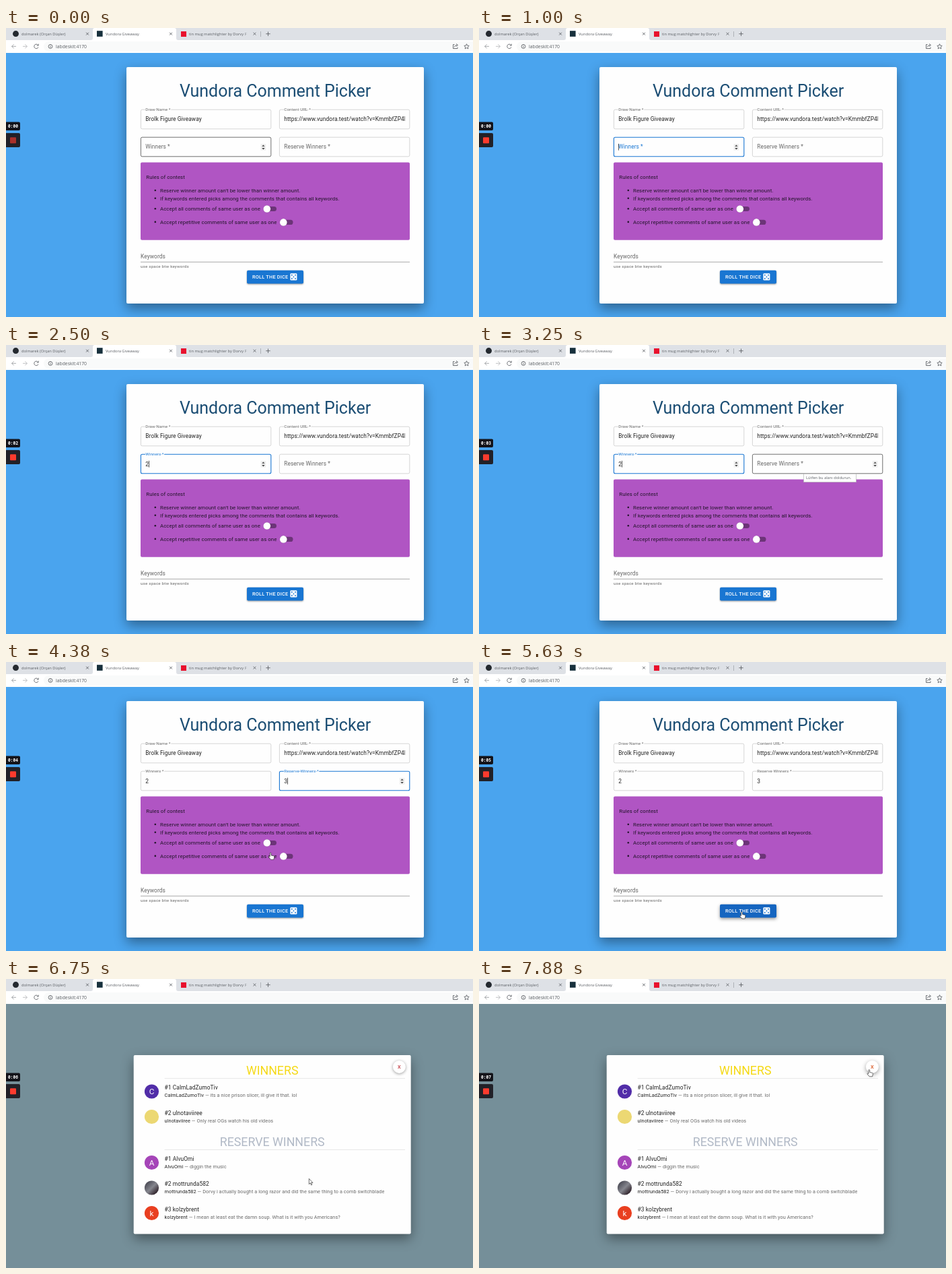
An HTML page for the animation above (8000 ms loop, 694 by 429 pixels).

```html
<!DOCTYPE html>
<html lang="en">
<head>
<meta charset="utf-8">
<title>Comment Picker</title>
<style>
  html, body { margin: 0; width: 100%; height: 100%; overflow: hidden; background: #4aa4ee; }
  svg { display: block; width: 694px; height: 429px; }
  text { font-family: Roboto, sans-serif; white-space: pre; }
  .ui { font-family: "Open Sans", sans-serif; fill: #5a5e63; }
  .body { letter-spacing: .00938em; }
  .label { letter-spacing: .00938em; paint-order: stroke; stroke: #fff; stroke-width: 2.5px; }
  .mid { text-anchor: middle; }
  .line { fill: none; stroke: #5f6368; stroke-width: .9; }
  .sheet { fill: #fefefe; filter: drop-shadow(0 7px 9px rgba(0,0,0,.4)); }
</style>
</head>
<body>
<svg id="stage" viewBox="0 0 694 429"></svg>
<script>
const LOOP = 8000, STEP = 125;
const stage = document.getElementById('stage');
const $ = id => document.getElementById(id);

const text = (x, y, s, size, fill, extra = 'class="body"') =>
  `<text x="${x}" y="${y}" font-size="${size}" fill="${fill}" ${extra}>${s}</text>`;
const ui = (x, y, s, size = 5.75) => text(x, y, s, size, '#5a5e63', 'class="ui"');
const rect = (x, y, w, h, fill, r = 0, extra = '') =>
  `<rect x="${x}" y="${y}" width="${w}" height="${h}" rx="${r}" fill="${fill}" ${extra}/>`;
const circle = (x, y, r, fill, extra = '') =>
  `<circle cx="${x}" cy="${y}" r="${r}" fill="${fill}" ${extra}/>`;
const path = (d, extra = 'class="line"') => `<path d="${d}" ${extra}/>`;
const cross = x => path(`M${x - 1.9} 6.7l3.8 3.8m0-3.8l-3.8 3.8`);

const browser = () =>
  rect(0, 0, 694, 18, '#dee1e6') +
  path('M126 18Q129 18 129 15V3Q129 0 132 0H250Q253 0 253 3V15Q253 18 256 18Z', 'fill="#fff"') +
  rect(0, 18, 694, 19, '#fff') + rect(56, 20, 650, 15, '#f9fafa', 7.5) +
  circle(14.5, 8.6, 4.5, '#24292f') + ui(23, 10.8, 'dolmarek (Orçan Düşler)') + cross(121) +
  rect(135, 4.2, 8.6, 8.6, '#17303c') + ui(148, 10.8, 'Vundora Giveaway') + cross(245) +
  rect(260, 5, 8, 8, '#e8112d') + ui(272, 10.8, 'tin mug matchlighter by Dorvy F') +
  rect(352, 2, 24, 14, 'url(#fade)') + cross(369.5) +
  path('M378.5 5V13', 'stroke="#9a9ea3" stroke-width=".7"') +
  path('M386.3 8.7h6.4M389.5 5.5v6.4') +
  path('M15 27.3H8.6m3-3l-3 3 3 3', 'class="line" stroke-opacity=".6"') +
  path('M25 27.3h6.4m-3-3l3 3-3 3', 'class="line" style="stroke:#babcbe"') +
  path('M47.6 25.4A3.2 3.2 0 1 0 48 28.4M48.2 23.6V26h-2.4') +
  circle(66, 27.4, 2.9, 'none', 'class="line"') + path('M66 27v2M66 25.4v.8') +
  ui(74, 29.9, 'labdeskit:4170', 6.8) +
  path('M666.5 24.5h-2v6h6.5v-2M666.3 28.5q.4-3 4-3M669 23.4l2.5 2-2.5 2') +
  path('M684.5 23.7l1.1 2.4 2.6.3-1.9 1.8.5 2.6-2.3-1.3-2.3 1.3.5-2.6-1.9-1.8 2.6-.3z');

const recorder = () =>
  rect(-4, 139.5, 25, 12.5, '#131319', 2) +
  text(3, 148.2, '0:00', 6.2, '#fff',
    'id="clock" font-weight="700" style="font-family:\'Noto Sans Mono\',monospace"') +
  rect(-4, 156, 25, 21, '#222128', 2) + rect(6, 162.3, 9, 9, '#fb3b2e', 1, 'id="rec"');

const spinner = (x, id) =>
  `<g id="${id}">${rect(x - 3.8, 172, 7.6, 9.6, '#efefef')}` +
  path(`M${x - 2.2} 175.8l2.2-2.4 2.2 2.4zm0 2.2l2.2 2.4 2.2-2.4z`, 'fill="#454545"') + '</g>';

const field = (x, y, label, id = '') =>
  rect(x + .4, y, 193.4, 28.6, 'none', 2, `stroke="#c4c4c4" stroke-width=".7" id="${id}Box"`) +
  `<text id="${id}Label" class="label" font-size="8.3" fill="#666"
    transform="translate(${x + 7.3} ${y + 1.4}) scale(.75)">${label}</text>`;

const toggle = (x, y) =>
  rect(x - 3.5, y - 3.6, 17.7, 7.2, '#6c3478', 3.6) +
  circle(x, y, 5.3, '#fff', 'style="filter:drop-shadow(0 .6px .7px rgba(0,0,0,.4))"');

const rule = (y, s) => circle(221.8, y - 2.7, 1.3, '#22142a') + text(229, y, s, 7.82, '#22142a');

const dice = () => rect(422.4, 364.2, 10, 10.4, '#fff', 1.4) +
  [[-2.6, -2.6], [2.6, -2.6], [0, 0], [-2.6, 2.6], [2.6, 2.6]]
    .map(([x, y]) => circle(427.4 + x, 369.4 + y, .95, '#1976d2')).join('');

const form = () => `<g id="form">` +
  rect(179, 58, 442, 351, '#fefefe', 2, 'class="sheet"') +
  text(400, 102, 'Vundora Comment Picker', 25, '#1c4e74', 'class="mid"') +
  field(200, 121.2, 'Draw Name *', 'draw') + field(406, 121.2, 'Content URL *', 'url') +
  text(207.3, 138, 'Brolk Figure Giveaway', 8.4, '#222') +
  `<g clip-path="url(#urlClip)">` +
  text(413.3, 138, 'https://www.vundora.test/watch?v=KmmbfZP4RQ', 8.4, '#222') + '</g>' +
  field(200, 162.2, 'Winners *', 'win') + field(406, 162.2, 'Reserve Winners *', 'res') +
  text(207.3, 179.8, '2', 8.4, '#222', 'id="winValue"') +
  text(413.3, 179.8, '3', 8.4, '#222', 'id="resValue"') +
  spinner(382.4, 'winSpin') + spinner(588.6, 'resSpin') + rect(0, 171.8, .7, 9.8, '#111', 0, 'id="caret"') +
  rect(200, 199.6, 400, 115.2, '#b055c3', 2) +
  text(208.3, 224.2, 'Rules of contest', 7.82, '#22142a') +
  rule(243.7, "Reserve winner amount can't be lower than winner amount.") +
  rule(255.5, 'If keywords entered picks among the comments that contains all keywords.') +
  rule(271, 'Accept all comments of same user as one') + toggle(387.8, 268.5) +
  rule(290.6, 'Accept repetitive comments of same user as one') + toggle(412.3, 288.4) +
  text(200, 342.2, 'Keywords', 8.4, '#666') +
  path('M200 347.4H600', 'stroke="#8c8c8c" stroke-width=".7"') +
  text(200, 356.4, 'use space btw keywords', 6.2, '#666', 'letter-spacing=".21"') +
  rect(358, 359.7, 84, 19.8, '#1976d2', 2, 'id="roll"') +
  text(366, 372.2, 'ROLL THE DICE', 7.35, '#fff', 'font-weight="500" letter-spacing=".21"') + dice() +
  `<g id="tip">${rect(482.5, 191.2, 78, 12.3, '#fff', 0, 'stroke="#b5b5b5" stroke-width=".7"')}` +
  ui(486, 199.4, 'Lütfen bu alanı doldurun.', 5.7) + '</g></g>';

const entry = (y, rank, name, comment) =>
  text(235.6, y - 3, `#${rank} ${name}`, 8.4, '#222') +
  text(235.6, y + 8.3, `<tspan fill="#222">${name}</tspan> — ${comment}`, 7.3, '#6a6a6a');
const letter = (y, s, fill) =>
  circle(216.5, y, 10.6, fill) + text(216.5, y + 4.2, s, 11.8, '#fff', 'class="mid"');

const dialog = () => `<g id="dialog">` + rect(0, 37, 694, 392, '#758f99') +
  rect(189.7, 113, 412, 265.6, '#fefefe', 2, 'class="sheet"') +
  text(395.7, 142.2, 'WINNERS', 17.8, '#f5d916', 'class="mid"') +
  text(395.7, 248.3, 'RESERVE WINNERS', 17.8, '#b1b9c6', 'class="mid"') +
  path('M235.6 147.6H593M235.6 253.4H593', 'stroke="#dedede" stroke-width=".7"') +
  entry(167, 1, 'CalmLadZumoTiv', 'its a nice prison slicer, ill give it that. lol') +
  entry(204.6, 2, 'ulnotaviiree', 'Only real OGs watch his old videos') +
  entry(272.6, 1, 'AlvuOmi', 'diggin the music') +
  entry(310, 2, 'mottrunda582', 'Dorvy i actually bought a long razor and did the same thing to a comb switchblade') +
  entry(347.6, 3, 'kolzybrent', 'I mean at least eat the damn soup. What is it with you Americans?') +
  `<g id="lateAvatar">${letter(167, 'C', '#512da8')}</g>` +
  circle(216.5, 204.5, 10.6, '#ecd873') +
  letter(272.5, 'A', '#a545b8') +
  circle(216.5, 310, 10.6, 'url(#dusk)') + letter(347.5, 'k', '#e93f20') +
  circle(584.4, 130.4, 9.5, '#fff', 'id="close"') +
  text(584.4, 133, 'X', 7.4, '#c2373f', 'id="closeX" class="mid" font-weight="500"') + '</g>';

const outline = 'fill="#fff" stroke="#333" stroke-width=".7" stroke-linejoin="round"';
const pointer = () => `<g id="pointer">` +
  path('M0 0V8.2L1.9 6.5 3.3 9.6 4.5 9 3.2 6.1H5.7Z', `id="arrow" ${outline}`) +
  path('M-.6 .6Q.3-.6 1.2 .6V4L5 4.8Q6 5.1 5.9 6.2L5.2 10.3H.7L-2.6 6.3Q-2.2 5-.6 6Z', `id="hand" ${outline}`) + '</g>';

stage.innerHTML = `<defs>
  <linearGradient id="fade"><stop stop-color="#dee1e6" stop-opacity="0"/><stop offset=".6" stop-color="#dee1e6"/></linearGradient>
  <linearGradient id="dusk" x2="1" y2="1"><stop stop-color="#34343f"/><stop offset=".5" stop-color="#85868e"/><stop offset=".8" stop-color="#3b3038"/></linearGradient>
  <clipPath id="urlClip"><rect x="413" y="124" width="180" height="22"/></clipPath></defs>` +
  rect(0, 37, 694, 392, '#4aa4ee') + form() + dialog() + browser() + recorder() + pointer();

// Times of the user's actions, in ms
const at = { focusWin: 1000, typeWin: 2200, hoverRes: 2700, tip: 3200, focusRes: 3600,
  typeRes: 3950, pointer: 4370, overRoll: 5150, blur: 5400, open: 5740, avatar: 5870, overClose: 7150 };
const route = [[4370, 392.8, 283], [4700, 392.8, 283], [5300, 390, 370.5], [6450, 390.5, 371.3], [7250, 579.5, 134.5]];

const clamp = v => Math.min(1, Math.max(0, v));
const ease = v => v * v * (3 - 2 * v);
const show = (id, on) => { $(id).style.display = on ? '' : 'none'; };

function position(t) {
  const i = route.findIndex(p => p[0] > t);
  if (i < 0) return route[route.length - 1].slice(1);
  if (i === 0) return route[0].slice(1);
  const [t0, x0, y0] = route[i - 1], [t1, x1, y1] = route[i];
  const k = ease((t - t0) / (t1 - t0));
  return [x0 + (x1 - x0) * k, y0 + (y1 - y0) * k];
}

function setField(id, x, t, focusAt, typeAt, focused, hover) {
  const k = ease(clamp((t - focusAt) / 200));
  const box = $(id + 'Box'), label = $(id + 'Label');
  box.setAttribute('stroke', focused ? '#1976d2' : hover ? '#333' : '#c4c4c4');
  box.setAttribute('stroke-width', focused ? 1.1 : .7);
  label.setAttribute('fill', focused ? '#1976d2' : '#666');
  label.setAttribute('transform', `translate(${x} ${179.2 - 15.4 * k}) scale(${1 - .25 * k})`);
  show(id + 'Value', t >= typeAt);
  show(id + 'Spin', focused || hover);
}

function draw(t) {
  const onWin = t >= at.focusWin && t < at.focusRes;
  const onRes = t >= at.focusRes && t < at.blur;
  setField('win', 207.3, t, at.focusWin, at.typeWin, onWin, t < at.focusWin);
  setField('res', 413.3, t, at.focusRes, at.typeRes, onRes, t >= at.hoverRes && t < at.focusRes);
  show('tip', t >= at.tip && t < at.focusRes);

  const typed = t >= (onWin ? at.typeWin : at.typeRes);
  const since = onWin ? (typed ? at.typeWin : at.focusWin) : (typed ? at.typeRes : at.focusRes);
  show('caret', (onWin || onRes) && (t - since) % 1000 < 500);
  $('caret').setAttribute('x', (onWin ? 207.3 : 413.3) + (typed ? 4.9 : 0));

  const overRoll = t >= at.overRoll, overClose = t >= at.overClose;
  $('roll').setAttribute('fill', overRoll ? '#1565c0' : '#1976d2');
  $('roll').style.filter = `drop-shadow(0 ${overRoll ? 2 : 1}px ${overRoll ? 2.5 : 1.3}px rgba(0,0,0,.4))`;
  show('form', t < at.open);
  show('dialog', t >= at.open);
  show('lateAvatar', t >= at.avatar);
  $('close').style.filter = `drop-shadow(0 ${overClose ? 2 : 1.4}px ${overClose ? 3 : 2}px rgba(0,0,0,.4))`;
  $('closeX').setAttribute('fill', overClose ? '#d9541e' : '#c2373f');

  $('clock').textContent = '0:0' + Math.max(0, Math.floor((t - 50) / 1000));
  $('rec').style.opacity = .62 + .38 * clamp(t / 500);

  const hand = t < 4800 || (overRoll && t < at.open) || overClose;
  show('pointer', t >= at.pointer);
  show('hand', hand);
  show('arrow', !hand);
  $('pointer').setAttribute('transform', `translate(${position(t)})`);
}

const start = performance.now();
function tick() {
  const t = (performance.now() - start) % LOOP;
  draw(Math.floor(t / STEP) * STEP);
  requestAnimationFrame(tick);
}
tick();
</script>
</body>
</html>
```
